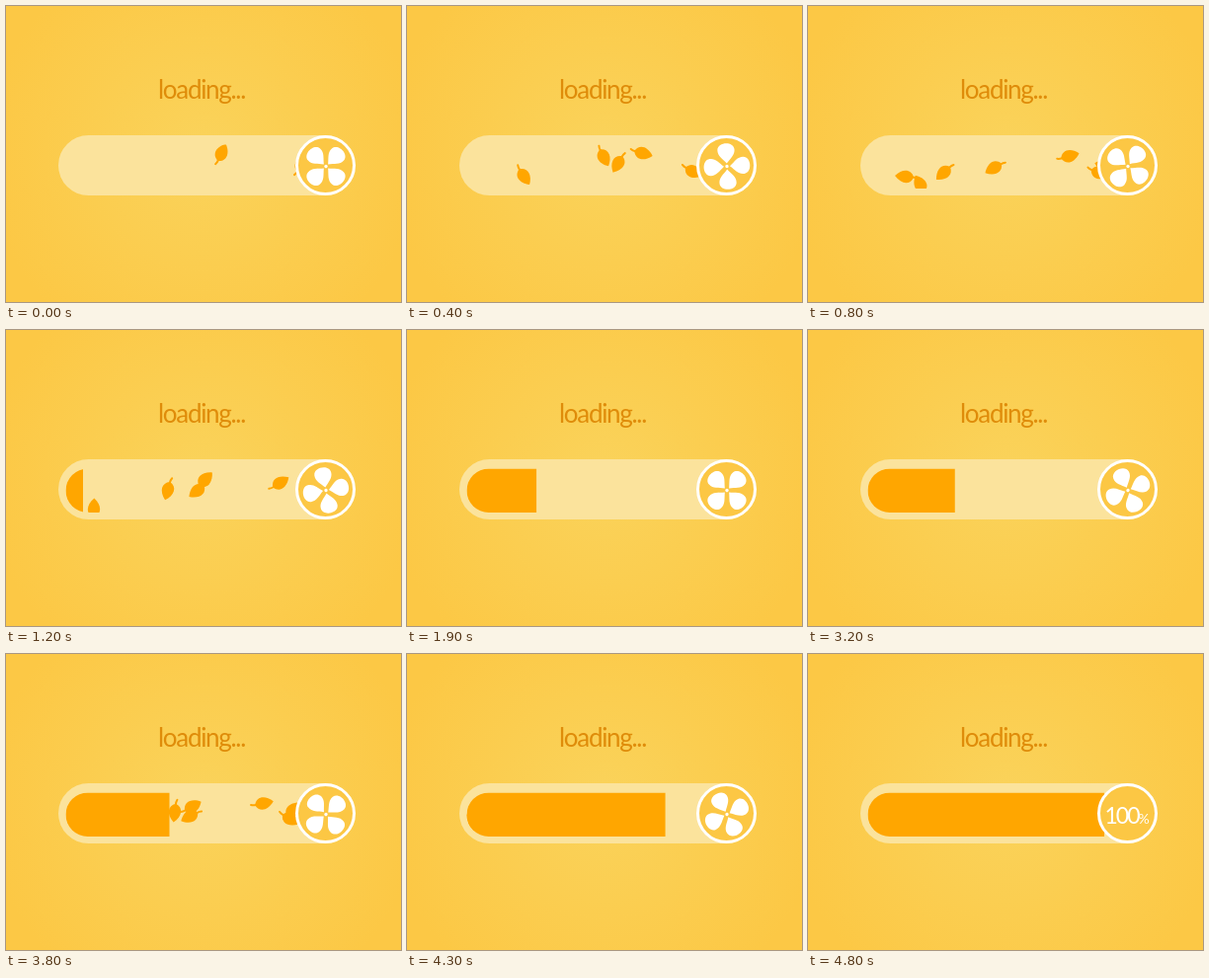
Write an HTML page with a canvas that moves like this. It is 400 px wide and 300 px high and loops after 4.9 s.

```html
<!DOCTYPE html>
<html lang="en">
<head>
<meta charset="utf-8">
<title>Loading</title>
<style>
html, body { margin: 0; width: 100%; height: 100%; overflow: hidden; background: #fcc845; }
canvas { display: block; }
</style>
</head>
<body>
<canvas id="stage" width="400" height="300"></canvas>
<script>
const ctx = document.getElementById('stage').getContext('2d');
const LOOP = 4900, STEP = 100;
const HUB = { x: 323.5, y: 161.5 };
const BAR = { x: 60.5, y: 140.5, h: 44.5 };
const ORANGE = '#ffa600';

// Key points: [time, value]
const FILL = [[850, 60], [1200, 78], [1850, 131], [2600, 132], [3800, 165.5], [4500, 300]];
const SPIN = [[0, 0], [1200, 416], [1900, 630], [4900, 1620]];

// Times at which the fan lets a leaf go, in three gusts
const GUSTS = [
  -320, 64, 4, 160, 364, 664, 812, 785, 1116,
  2032, 2216,
  3292, 3360, 3356, 3648, 3768, 3756
];

const clamp = v => Math.max(0, Math.min(1, v));
const ease = v => { v = clamp(v); return v * v * (3 - 2 * v); };
const rad = deg => deg * Math.PI / 180;

function keyed(keys, t) {
  const i = keys.findIndex(k => k[0] >= t);
  if (i <= 0) return keys[i < 0 ? keys.length - 1 : 0][1];
  const [a, from] = keys[i - 1], [b, to] = keys[i];
  return from + (to - from) * (t - a) / (b - a);
}

function pill(x, y, w, h) {
  ctx.beginPath();
  ctx.roundRect(x, y, w, h, h / 2);
}

function disc(x, y, r) {
  ctx.beginPath();
  ctx.arc(x, y, r, 0, Math.PI * 2);
}

function backdrop() {
  const g = ctx.createRadialGradient(200, 150, 0, 200, 150, 220);
  g.addColorStop(0, '#fad35b');
  g.addColorStop(1, '#fcc845');
  ctx.fillStyle = g;
  ctx.fillRect(0, 0, 400, 300);
}

// A leaf rides one wave across the track and tumbles as it goes;
// every third flies low, every sixth starts turned away.
function leaf(launch, i, t) {
  const gone = 0.25 * (t - launch);
  if (gone < -5 || gone > 255) return;
  const low = i % 3 === 1 ? 1 : 0;
  const turned = i % 6 === 0 ? 1 : 0;
  ctx.save();
  ctx.translate(298 - gone, 161 + 9 * low - 12 * Math.sin(gone / 42));
  ctx.rotate(rad(1.22 * gone - 58 + 75 * low - 105 * turned));
  ctx.beginPath();
  ctx.moveTo(-8, 0);
  ctx.bezierCurveTo(-5, -8.4, 4, -8, 11, 0);
  ctx.bezierCurveTo(4, 8, -5, 8.4, -8, 0);
  ctx.fill();
  ctx.beginPath();
  ctx.moveTo(-7, 0);
  ctx.quadraticCurveTo(-10, 0, -12, -1);
  ctx.stroke();
  ctx.restore();
}

function track(t) {
  ctx.fillStyle = '#fbe39c';
  pill(53, 131, 300, 61);
  ctx.fill();
  ctx.save();
  pill(BAR.x, BAR.y, 280, BAR.h);
  ctx.clip();
  ctx.fillStyle = ctx.strokeStyle = ORANGE;
  ctx.lineWidth = 2;
  ctx.lineCap = 'round';
  GUSTS.forEach((launch, i) => leaf(launch, i, t));
  ctx.fillRect(BAR.x, BAR.y, Math.max(0, keyed(FILL, t) - BAR.x), BAR.h);
  ctx.restore();
}

function fan(t) {
  const size = 1 - ease((t - 4350) / 250);
  if (size <= 0) return;
  ctx.save();
  ctx.translate(HUB.x + 0.5, HUB.y + 1);
  ctx.scale(size, size);
  ctx.rotate(rad(45 - keyed(SPIN, t)));
  ctx.fillStyle = '#fff';
  for (let i = 0; i < 4; i++) {
    ctx.rotate(Math.PI / 2);
    ctx.beginPath();
    ctx.moveTo(3, 0);
    ctx.bezierCurveTo(8, -4, 11, -9, 17, -8.6);
    ctx.bezierCurveTo(25.5, -8, 25.5, 8, 17, 8.6);
    ctx.bezierCurveTo(11, 9, 8, 4, 3, 0);
    ctx.fill();
  }
  disc(0, 0, 1.7);
  ctx.fill();
  ctx.restore();
}

function write(text, x, y, font, color, spacing = '0px') {
  ctx.font = font + ' Lato, sans-serif';
  ctx.letterSpacing = spacing;
  ctx.fillStyle = color;
  ctx.fillText(text, x, y);
}

function percent(t) {
  const size = ease((t - 4500) / 250);
  if (size <= 0) return;
  ctx.save();
  ctx.translate(HUB.x, HUB.y);
  ctx.scale(size, size);
  write('100', -23, 10.5, '400 23px', '#fff', '-2px');
  write('%', 11, 10.5, '400 14px', '#fff');
  ctx.restore();
}

function draw(t) {
  backdrop();
  write('loading...', 154, 94, '400 26px', '#df8c0a', '-1.3px');
  track(t);
  disc(HUB.x, HUB.y, 29);
  ctx.fillStyle = '#fcc744';
  ctx.fill();
  ctx.strokeStyle = '#fff';
  ctx.lineWidth = 3;
  ctx.stroke();
  fan(t);
  percent(t);
}

const start = performance.now();
function tick(now) {
  const t = Math.max(0, now - start) % LOOP;
  draw(Math.floor(t / STEP) * STEP);
  requestAnimationFrame(tick);
}
draw(0);
requestAnimationFrame(tick);
</script>
</body>
</html>
```
